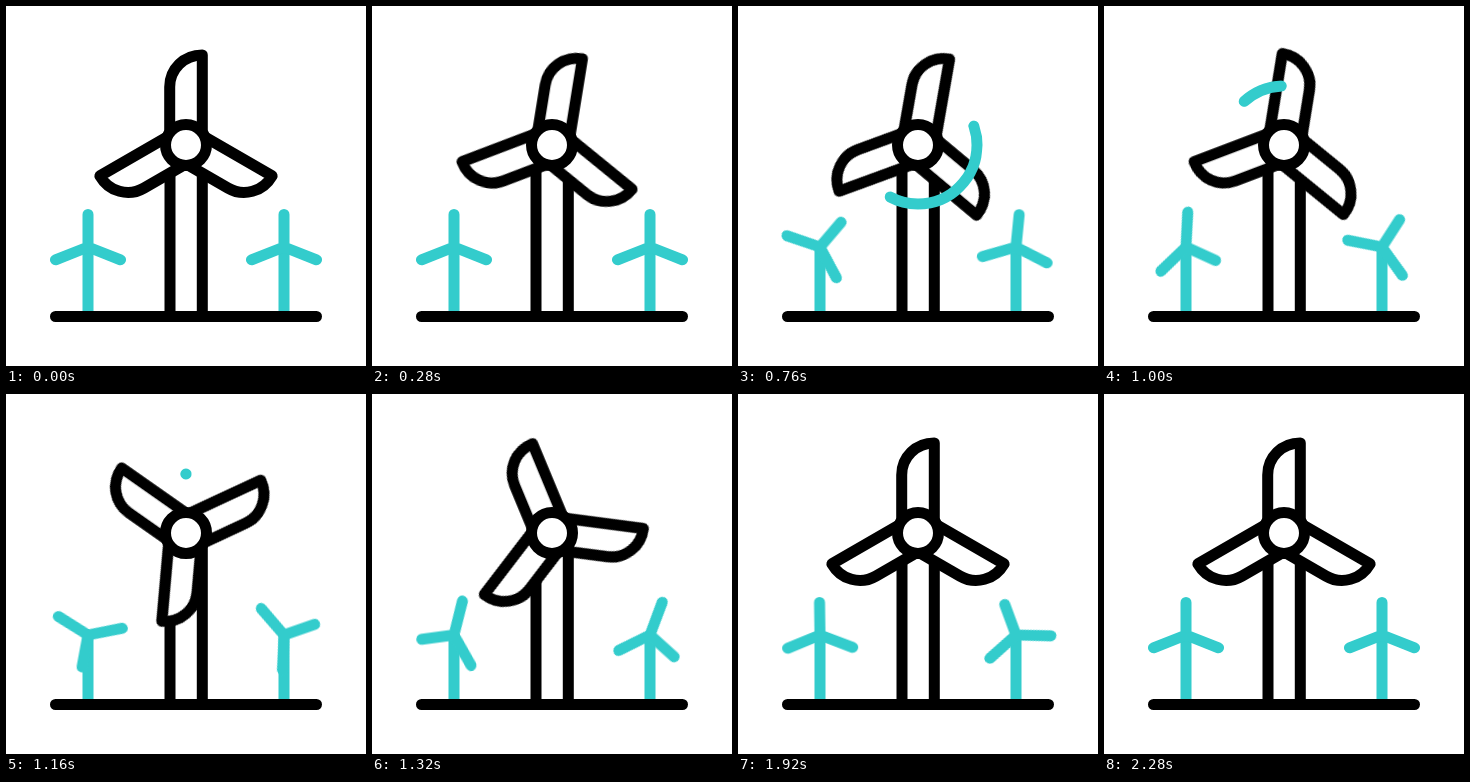
Animation, 360 px wide and 360 px high, one loop 2320 ms. Source, as an HTML page without scripts:

```html
<!DOCTYPE html>
<html lang="en">
<head>
<meta charset="utf-8">
<title>Wind turbines</title>
<style>
  @property --tail { syntax: "<length>"; inherits: false; initial-value: 0px; }
  @property --head { syntax: "<length>"; inherits: false; initial-value: 0px; }

  html, body { margin: 0; width: 100%; height: 100%; overflow: hidden; background: #fff; }
  svg { display: block; width: 100%; height: 100%; }

  .line { fill: none; stroke: #000; stroke-width: 11; stroke-linecap: round; stroke-linejoin: round; }
  .solid { fill: #fff; }
  .butt { stroke-linecap: butt; }
  .teal { stroke: #33cccc; }

  .rotor { animation: 2320ms infinite cubic-bezier(.58, 0, .42, 1); }
  .main { animation-name: turn-main; }
  .left { animation-name: turn-left; }
  .right { animation-name: turn-right; }

  @keyframes turn-main {
    0%, 1.724% { transform: rotate(0deg); }
    72.414%, 100% { transform: rotate(360deg); }
  }
  @keyframes turn-left {
    0%, 12.069% { transform: rotate(0deg); }
    86.207%, 100% { transform: rotate(360deg); }
  }
  @keyframes turn-right {
    0%, 24.138% { transform: rotate(0deg); }
    98.276%, 100% { transform: rotate(360deg); }
  }

  /* 370.7px is the full length of the gust circle */
  .gust {
    stroke-dasharray: calc(var(--head) - var(--tail)) 400px;
    stroke-dashoffset: calc(0px - var(--tail));
    animation: 2320ms infinite cubic-bezier(.58, 0, .42, 1);
    animation-name: head, tail, show;
  }
  @keyframes head {
    0%, 18.103% { --head: 0px; }
    45.69%, 100% { --head: 370.7px; }
  }
  @keyframes tail {
    0%, 22.845% { --tail: 0px; }
    51.293%, 100% { --tail: 370.7px; }
  }
  @keyframes show {
    0% { opacity: 0; animation-timing-function: step-end; }
    18.6% { opacity: 1; animation-timing-function: step-end; }
    51%, 100% { opacity: 0; }
  }
</style>
</head>
<body>
<svg viewBox="0 0 360 360">
  <defs>
    <path id="blade" d="M-16.3-13V-58C-16.3-76-2-90 16.3-90V-13"/>
    <path id="arms" d="M-32.5 12.8L0 0L32.5 12.8M0 0V-32.5"/>
  </defs>

  <g class="line teal">
    <path class="butt" d="M82 241V308M278 241V308"/>
    <g transform="translate(82 241)"><use href="#arms" class="rotor left"/></g>
    <g transform="translate(278 241)"><use href="#arms" class="rotor right"/></g>
  </g>

  <g class="line">
    <path d="M49.5 310.5H310.5"/>
    <path class="butt" d="M164 152V310M196.3 152V310"/>
    <g transform="translate(180 139)">
      <g class="rotor main solid butt">
        <use href="#blade"/>
        <use href="#blade" transform="rotate(-120)"/>
        <use href="#blade" transform="rotate(120) scale(-1 1)"/>
      </g>
      <circle class="solid" r="20.5"/>
      <circle class="gust teal" r="59" transform="rotate(-90)"/>
    </g>
  </g>
</svg>
</body>
</html>
```
